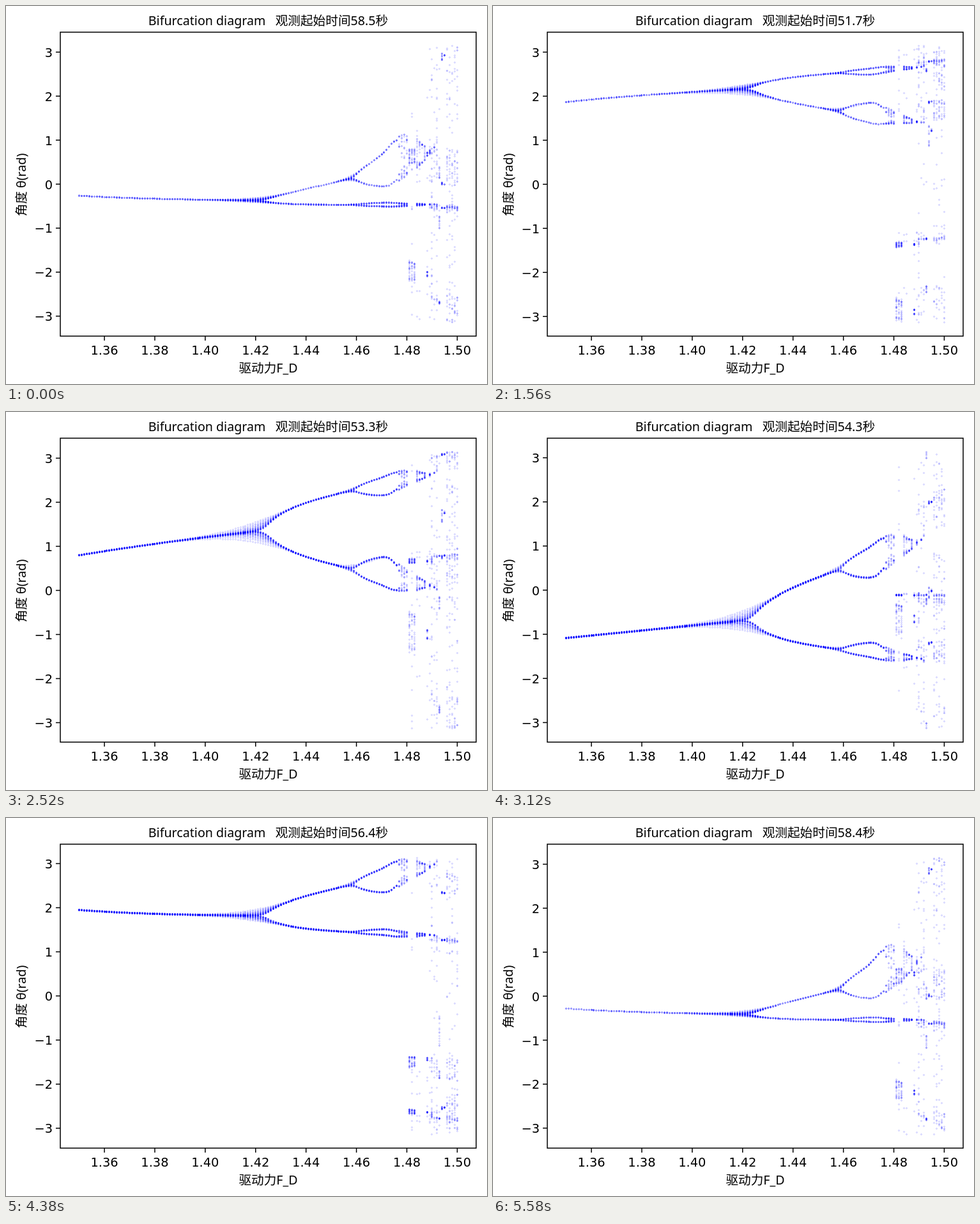
Animation, 753 px wide and 592 px high, one loop 5640 ms. Source, as an HTML page with a canvas:

```html
<!DOCTYPE html>
<html lang="zh">
<head>
<meta charset="utf-8">
<title>Bifurcation diagram</title>
<style>
html, body { margin: 0; width: 753px; height: 592px; overflow: hidden; background: #fff; }
canvas, svg { position: absolute; left: 0; top: 0; }
text { font: 19.65px 'Noto Sans', 'Noto Sans CJK SC', 'Noto Sans CJK', sans-serif; text-anchor: middle; white-space: pre; }
.tick { font-family: 'DejaVu Sans', sans-serif; font-size: 19.4px; }
.left { text-anchor: end; }
path, rect { fill: none; stroke: #000; stroke-width: 1.5; }
</style>
</head>
<body>
<canvas width="753" height="592"></canvas>
<svg width="753" height="592">
  <rect x="85" y="41" width="651" height="476"/>
  <text id="title" x="410.5" y="30"></text>
  <text x="410.5" y="574">驱动力F_D</text>
  <text transform="translate(31 280) rotate(-90)">角度 θ(rad)</text>
  <g id="xAxis"></g>
  <g id="yAxis"></g>
</svg>
<script>
const FRAMES = 94, FRAME_MS = 60, COLUMNS = 151;
const H = 0.01, END = 50000, PERIOD = 3 * Math.PI, DAMP = 0.25 * H;
const ctx = document.querySelector('canvas').getContext('2d');
const el = id => document.getElementById(id);
const xOf = force => 114.6 + (force - 1.35) * 3945.4;

// Driven damped pendulum, started near the lower branch of its rotating orbit
const START = Math.round((58.5 - 6 * PERIOD) / H);
const drive = Float64Array.from({ length: END }, (_, i) => Math.sin((i + 0.5) * H * 2 / 3));

function simulate(force) {
  const path = new Float32Array(END);
  let angle = -0.47, speed = 0.68;
  for (let i = START; i < END; i++) {
    path[i] = angle;
    angle += speed * H / 2;
    const push = force * drive[i] - Math.sin(angle);
    speed = (speed * (1 - DAMP) + H * push) / (1 + DAMP);
    angle += speed * H / 2;
  }
  return path;
}

const paths = Array.from({ length: COLUMNS }, (_, i) => simulate(1.35 + i / 1000));
const wrap = a => a - 2 * Math.PI * Math.round(a / (2 * Math.PI));

// Angles seen once per drive period, from the given time on
function strobe(path, time) {
  const seen = [];
  for (let t = time; t < END * H - H; t += PERIOD) seen.push(wrap(path[Math.round(t / H)]));
  return seen;
}

for (let i = 0; i < 8; i++) {
  const force = 1.36 + i * 0.02, x = xOf(force);
  el('xAxis').innerHTML += `<path d="M${x} 517v7"/><text class="tick" x="${x}" y="546">${force.toFixed(2)}</text>`;
}

function draw(frame) {
  const time = 49.1 + (frame || FRAMES) / 10;
  const columns = paths.map(path => strobe(path, time));
  const all = columns.flat();
  const low = Math.min(...all), high = Math.max(...all);
  const yOf = a => 495.4 - (a - low) / (high - low) * 432.7;

  ctx.clearRect(0, 0, 753, 592);
  ctx.strokeStyle = '#00f';
  ctx.lineWidth = 0.95;
  columns.forEach((angles, i) => {
    const x = Math.floor(xOf(1.35 + i / 1000)) + 0.5;
    // Points that coincide within a quarter pixel soon stop adding ink
    const counts = new Map();
    for (const a of angles) {
      const y = Math.round(yOf(a) * 4) / 4;
      counts.set(y, (counts.get(y) || 0) + 1);
    }
    for (const [y, count] of counts) {
      ctx.globalAlpha = 1 - 0.78 ** Math.min(count, 5);
      ctx.beginPath();
      ctx.arc(x, Math.floor(y) + 0.5, 0.95, 0, 7);
      ctx.stroke();
    }
  });

  el('title').textContent = `Bifurcation diagram\u00a0\u00a0\u00a0观测起始时间${time.toFixed(1)}秒`;
  el('yAxis').innerHTML = [-3, -2, -1, 0, 1, 2, 3].map(v => {
    const y = yOf(v);
    return `<path d="M85 ${y}h-7"/><text class="tick left" x="73" y="${Math.round(y + 7.6)}">${String(v).replace('-', '−')}</text>`;
  }).join('');
}

let shown = -1;
function tick() {
  const frame = Math.floor(performance.now() / FRAME_MS) % FRAMES;
  if (frame !== shown) draw(shown = frame);
  requestAnimationFrame(tick);
}
tick();
</script>
</body>
</html>
```
